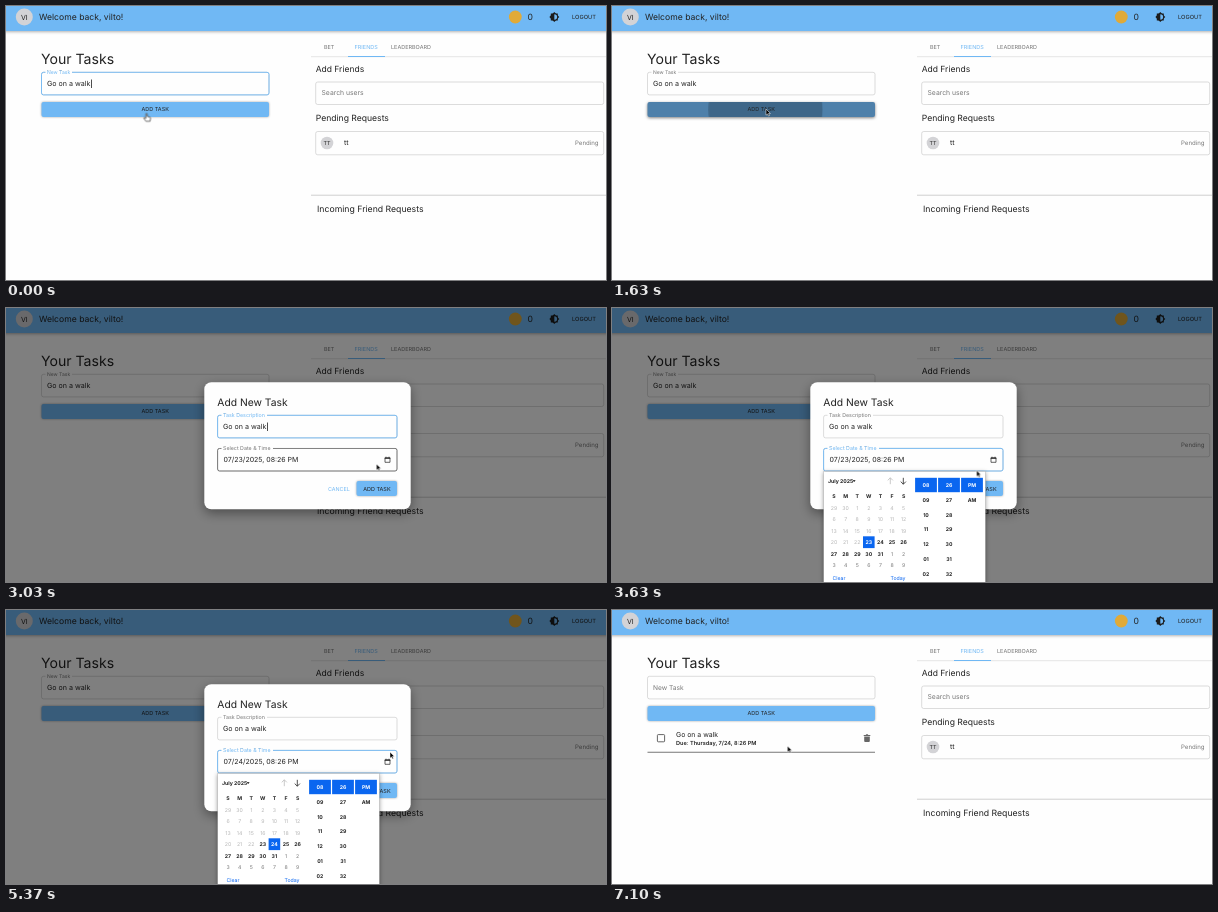
An HTML page that plays this animation: 600x274 px, repeating every 7140 ms.

```html
<!DOCTYPE html>
<html lang="en">
<head>
<meta charset="utf-8">
<title>Task planner</title>
<style>
  html, body { margin: 0; width: 100%; height: 100%; overflow: hidden; background: #fefefe; }
  svg { display: block; width: 100vw; height: 100vh; --blue: #70b8f4; --dark: #4e80aa; }
  text { font-family: Inter, "Open Sans", sans-serif; fill: #222; text-rendering: geometricPrecision; white-space: pre; }
  .mid { text-anchor: middle; }
  .bold { font-weight: 700; }
  .blue { fill: var(--blue); }
  .gray { fill: #777; }
  .white { fill: #fff; }
  .bg { fill: #fefefe; }
  .box { fill: none; stroke: #c4c4c4; stroke-width: .6; }
  .on { fill: none; stroke: var(--blue); stroke-width: .9; }
  .btn { fill: var(--blue); filter: drop-shadow(0 .8px .8px rgba(0,0,0,.35)); }
  .bar { fill: var(--blue); filter: drop-shadow(0 1px 1.5px rgba(0,0,0,.3)); }
  .avatar { fill: #d3d3d6; }
  .paper { fill: #fefefe; filter: drop-shadow(0 4px 6px rgba(0,0,0,.4)); }
  .popup { fill: #fff; stroke: #aaa; stroke-width: .4; filter: drop-shadow(0 1px 2px rgba(0,0,0,.4)); }
  .pick { fill: #0a66f0; }

  /* hard switches */
  .pageFocus, .filled, .done, .caret, .taskFocus, .dateFocus, .dateHover,
  .calendar, .before, .after, .cellHover, .hand, .arrow {
    animation: 7140ms step-end infinite;
  }
  .pageFocus { animation-name: pageFocus; }
  .filled { animation-name: filled; }
  .done { animation-name: done; }
  .caret { animation-name: caret; }
  .taskFocus { animation-name: taskFocus; }
  .dateFocus { animation-name: dateFocus; }
  .dateHover { animation-name: dateHover; }
  .calendar { animation-name: calendar; }
  .before { animation-name: before; }
  .after { animation-name: after; }
  .cellHover { animation-name: cellHover; }
  .hand { animation-name: hand; }
  .arrow { animation-name: arrow; }
  @keyframes pageFocus { 0% { opacity: 1 } 20.22%, 100% { opacity: 0 } }
  @keyframes filled { 0% { opacity: 1 } 88.66%, 100% { opacity: 0 } }
  @keyframes done { 0% { opacity: 0 } 88.66%, 100% { opacity: 1 } }
  @keyframes caret {
    0%, 9.8%, 23.8%, 37.8% { opacity: 1 }
    2.8%, 16.8%, 30.8%, 44.8%, 100% { opacity: 0 }
  }
  @keyframes taskFocus { 0% { opacity: 1 } 46.9%, 100% { opacity: 0 } }
  @keyframes dateFocus { 0%, 85.15%, 100% { opacity: 0 } 46.9% { opacity: 1 } }
  @keyframes dateHover { 0%, 46.9%, 100% { opacity: 0 } 39% { opacity: 1 } }
  @keyframes calendar { 0%, 77%, 100% { opacity: 0 } 47.6% { opacity: 1 } }
  @keyframes before { 0% { opacity: 1 } 63%, 100% { opacity: 0 } }
  @keyframes after { 0% { opacity: 0 } 63%, 100% { opacity: 1 } }
  @keyframes cellHover { 0%, 63%, 100% { opacity: 0 } 59.5% { opacity: 1 } }
  @keyframes hand { 0%, 17.5%, 81.5% { opacity: 1 } 5.5%, 20.22%, 91.5%, 100% { opacity: 0 } }
  @keyframes arrow { 0%, 17.5%, 81.5% { opacity: 0 } 5.5%, 20.22%, 91.5%, 100% { opacity: 1 } }

  /* smooth changes */
  .dialog { animation: dialog 7140ms ease-in-out infinite; }
  @keyframes dialog {
    0%, 22.97% { opacity: 0 }
    26.12%, 88.66% { opacity: 1 }
    91.46%, 100% { opacity: 0 }
  }
  .pageBtn { animation: pageBtn 7140ms ease-in-out infinite; }
  @keyframes pageBtn {
    0%, 16.8%, 26.5%, 100% { fill: var(--blue); filter: drop-shadow(0 .8px .8px rgba(0,0,0,.35)) }
    20.2%, 23% { fill: var(--dark); filter: drop-shadow(0 1.6px 1.8px rgba(0,0,0,.5)) }
  }
  .sendBtn { animation: sendBtn 7140ms ease-in-out infinite; }
  @keyframes sendBtn {
    0%, 81.5% { fill: var(--blue); filter: drop-shadow(0 .8px .8px rgba(0,0,0,.35)) }
    85%, 100% { fill: var(--dark); filter: drop-shadow(0 1.6px 1.8px rgba(0,0,0,.5)) }
  }
  .ripple { fill: #000; transform-box: fill-box; transform-origin: center; }
  .pageRipple { animation: pageRipple 7140ms cubic-bezier(.4,0,.2,1) infinite; }
  @keyframes pageRipple {
    0%, 20.22% { transform: scale(0); opacity: .2 }
    27.93% { transform: scale(1); opacity: .2 }
    32%, 100% { transform: scale(1); opacity: 0 }
  }
  .sendRipple { animation: sendRipple 7140ms cubic-bezier(.4,0,.2,1) infinite; }
  @keyframes sendRipple {
    0%, 85.15% { transform: scale(0); opacity: .2 }
    92.86%, 100% { transform: scale(1); opacity: .2 }
  }
  .cursor { animation: cursor 7140ms ease-in-out infinite; }
  @keyframes cursor {
    0% { transform: translate(140.5px, 107.5px) }
    8.4%, 14.7% { transform: translate(147px, 95.5px) }
    18.9%, 26.6% { transform: translate(154px, 103px) }
    40.6%, 42.5% { transform: translate(370.5px, 156px) }
    45.5%, 47.6% { transform: translate(380.5px, 151.5px) }
    60.2%, 65.1% { transform: translate(265.5px, 230.5px) }
    74.9%, 77.3% { transform: translate(384px, 142px) }
    82.6%, 92.9% { transform: translate(382.5px, 178.5px) }
    99.1%, 100% { transform: translate(175.5px, 136px) }
  }
</style>
</head>
<body>
<svg viewBox="0 0 600 274" preserveAspectRatio="none">
  <defs>
    <clipPath id="pageClip"><rect x="35.5" y="96" width="227.5" height="15" rx="2"/></clipPath>
    <clipPath id="sendClip"><rect x="350.5" y="173" width="40.5" height="15" rx="2"/></clipPath>
  </defs>
  <rect class="bg" width="600" height="274"/>

  <!-- header -->
  <rect class="bar" x="-5" y="-5" width="610" height="30"/>
  <circle class="avatar" cx="18.3" cy="11" r="8.5"/>
  <text class="mid" x="18.3" y="13.5" font-size="7">VI</text>
  <text x="33" y="14.2" font-size="8.6">Welcome back, vilto!</text>
  <circle cx="509.3" cy="11" r="6.4" fill="#e0aa38"/>
  <text x="521.5" y="14.1" font-size="8.6">0</text>
  <g transform="translate(548.3 11)" fill="#1c1c1c">
    <rect x="-3.5" y="-3.5" width="7" height="7"/>
    <rect x="-3.5" y="-3.5" width="7" height="7" transform="rotate(45)"/>
    <path class="blue" d="M0-2.8a2.8 2.8 0 0 1 0 5.6z"/>
  </g>
  <text x="566" y="13" font-size="5.7">LOGOUT</text>

  <!-- tasks -->
  <text x="35" y="57.5" font-size="14.1">Your Tasks</text>
  <rect class="box" x="35.5" y="66.3" width="227.5" height="22.6" rx="2"/>
  <g class="filled">
    <rect class="bg" x="39.5" y="65" width="26.5" height="3"/>
    <text class="gray" x="41" y="68.2" font-size="5">New Task</text>
    <text x="41" y="80" font-size="7.1">Go on a walk</text>
  </g>
  <g class="pageFocus">
    <rect class="on" x="35.5" y="66.3" width="227.5" height="22.6" rx="2"/>
    <rect class="bg" x="39.5" y="65" width="26.5" height="4"/>
    <text class="blue" x="41" y="68.2" font-size="5">New Task</text>
    <rect class="caret" x="85" y="73.5" width=".7" height="8.5"/>
  </g>
  <rect class="btn pageBtn" x="35.5" y="96" width="227.5" height="15" rx="2"/>
  <g clip-path="url(#pageClip)"><circle class="ripple pageRipple" cx="153.5" cy="103.5" r="120"/></g>
  <text class="mid" x="149.2" y="105.4" font-size="5.5">ADD TASK</text>
  <g class="done">
    <text class="gray" x="41" y="80" font-size="6.6">New Task</text>
    <rect x="45.4" y="124.6" width="7.2" height="7.2" rx=".8" fill="none" stroke="#555" stroke-width=".9"/>
    <text x="64" y="126.5" font-size="6.9">Go on a walk</text>
    <text x="64" y="135" font-size="5.6" font-weight="600">Due: Thursday, 7/24, 8:26 PM</text>
    <path fill="#666" d="M251.7 124.9h2l.5-.7h1.6l.5.7h2v1h-6.6zM252.2 126.4h5.6v4.7q0 .9-.9.9h-3.8q-.9 0-.9-.9z"/>
    <rect x="35.5" y="141.8" width="227.5" height=".8" fill="#555"/>
  </g>

  <!-- friends -->
  <g font-size="5.5">
    <text class="mid gray" x="323.2" y="43">BET</text>
    <text class="mid blue" x="360.2" y="43">FRIENDS</text>
    <text class="gray" x="385" y="43">LEADERBOARD</text>
  </g>
  <rect x="305" y="50.6" width="295" height=".5" fill="#ccc"/>
  <rect class="blue" x="342" y="50" width="37" height="1"/>
  <text x="309.7" y="65.5" font-size="8.5">Add Friends</text>
  <rect class="box" x="309.7" y="76" width="288" height="22.5" rx="2"/>
  <text class="gray" x="315.5" y="89.4" font-size="6.8">Search users</text>
  <text x="309.7" y="115" font-size="8.6">Pending Requests</text>
  <rect class="box" x="309.7" y="125.5" width="288" height="23.3" rx="2"/>
  <circle class="avatar" cx="321" cy="137" r="6.3"/>
  <text class="mid" x="321" y="139" font-size="5.4">TT</text>
  <text x="338" y="139.4" font-size="7">tt</text>
  <text class="gray" x="569" y="139.2" font-size="6.1">Pending</text>
  <rect x="305" y="188.8" width="295" height=".7" fill="#bbb"/>
  <text x="311" y="205.7" font-size="8.7">Incoming Friend Requests</text>

  <!-- dialog -->
  <g class="dialog">
    <rect width="600" height="274" opacity=".5"/>
    <rect class="paper" x="198.3" y="74.3" width="206.4" height="127" rx="7"/>
    <text x="211.3" y="97.6" font-size="10.3">Add New Task</text>

    <rect class="box" x="211.6" y="107.3" width="179.4" height="22.6" rx="2"/>
    <rect class="bg" x="215.5" y="106" width="45.5" height="3"/>
    <text class="gray" x="217" y="109.2" font-size="5.3">Task Description</text>
    <g class="taskFocus">
      <rect class="on" x="211.6" y="107.3" width="179.4" height="22.6" rx="2"/>
      <rect class="bg" x="215.5" y="105.5" width="45.5" height="4.5"/>
      <text class="blue" x="217" y="109.2" font-size="5.3">Task Description</text>
      <rect class="caret" x="261" y="114.5" width=".7" height="8.5"/>
    </g>
    <text x="217" y="121.2" font-size="7.1">Go on a walk</text>

    <rect class="box" x="211.6" y="140.4" width="179.4" height="22.6" rx="2"/>
    <rect class="dateHover" x="211.6" y="140.4" width="179.4" height="22.6" rx="2" fill="none" stroke="#333" stroke-width=".6"/>
    <rect class="bg" x="215.5" y="139" width="51.5" height="3"/>
    <text class="gray" x="217" y="142.3" font-size="5.3">Select Date &amp; Time</text>
    <g class="dateFocus">
      <rect class="on" x="211.6" y="140.4" width="179.4" height="22.6" rx="2"/>
      <rect class="bg" x="215.5" y="138.5" width="51.5" height="4.5"/>
      <text class="blue" x="217" y="142.3" font-size="5.3">Select Date &amp; Time</text>
    </g>
    <text class="before" x="217.5" y="154.3" font-size="7">07/23/2025, 08:26 PM</text>
    <text class="after" x="217.5" y="154.3" font-size="7">07/24/2025, 08:26 PM</text>
    <path d="M379 150h5v4.3h-5zM380 148.7v1M383 148.7v1" fill="none" stroke="#222" stroke-width=".7"/>
    <path d="M378.7 149.5h5.6v1.2h-5.6z" fill="#222"/>

    <text class="blue" x="322" y="182.7" font-size="5.4">CANCEL</text>
    <rect class="btn sendBtn" x="350.5" y="173" width="40.5" height="15" rx="2"/>
    <g clip-path="url(#sendClip)"><circle class="ripple sendRipple" cx="382" cy="181" r="40"/></g>
    <text class="mid" x="370.9" y="182.7" font-size="5.5">ADD TASK</text>
  </g>

  <!-- date picker -->
  <g class="calendar" id="calendar" font-size="5.2">
    <rect class="popup" x="211.8" y="163.5" width="161.5" height="116"/>
    <text class="bold" x="216" y="174.8">July 2025</text>
    <path d="M240.6 172.2h3l-1.5 1.9z"/>
    <path d="M278.3 176.2v-6.4m-2.6 2.6l2.6-2.6 2.6 2.6" fill="none" stroke="#bbb" stroke-width=".8"/>
    <path d="M291.3 169.8v6.4m-2.6-2.6l2.6 2.6 2.6-2.6" fill="none" stroke="#222" stroke-width=".8"/>
    <text class="mid pick" x="227" y="272">Clear</text>
    <text class="mid pick" x="286" y="272">Today</text>
  </g>

  <g class="cursor">
    <path class="arrow" d="M0 0V6.2L1.5 4.9 2.5 7 3.5 6.6 2.5 4.5H4.4Z" stroke="#fff" stroke-width=".5"/>
    <path class="hand" d="M-.7.6a.7.7 0 0 1 1.4 0V3l2.6.6q.9.3.7 1.4l-.5 2.8H-.6L-2.7 5q-.3-.8.5-.9l1.5.8Z" fill="#fff" stroke="#111" stroke-width=".6"/>
  </g>
</svg>
<script>
  const calendar = document.getElementById('calendar');

  function add(tag, attrs, content = '') {
    const node = document.createElementNS('http://www.w3.org/2000/svg', tag);
    for (const key in attrs) node.setAttribute(key, attrs[key]);
    node.textContent = content;
    calendar.append(node);
    return node;
  }
  const label = (x, y, content, cls = '', fill = '#222') =>
    add('text', { x, y: y + 1.9, class: 'mid ' + cls }, content).style.fill = fill;
  const block = (x, y, w, h, cls) =>
    add('rect', { x: x - w / 2, y: y - h / 2, width: w, height: h, class: cls });

  const colX = c => 222 + c * 11.6;
  const rowY = r => 200 + r * 11.4;

  [...'SMTWTFS'].forEach((day, c) => label(colX(c), 188, day, 'bold'));

  // Six weeks, starting on June 29
  for (let i = 0; i < 42; i++) {
    const day = i - 1;
    const x = colX(i % 7), y = rowY(Math.floor(i / 7));
    const shown = day < 1 ? day + 30 : day > 31 ? day - 31 : day;
    const fill = day < 23 ? '#b5b5b5' : day > 31 ? '#777' : '#222';
    label(x, y, shown, day > 22 && day < 32 ? 'bold' : '', fill);
    if (day === 24) block(x, y, 11.2, 11.4, 'cellHover').style.cssText = 'fill:#a9cbee;stroke:#4a78b0;stroke-width:.6';
    if (day === 24) label(x, y, day, 'bold cellHover');
    if (day === 23 || day === 24) {
      const state = day === 23 ? 'before' : 'after';
      block(x, y, 11.6, 11.8, 'pick ' + state);
      label(x, y, day, 'bold ' + state, '#fff');
    }
  }

  const pad = n => String(n).padStart(2, '0');
  const rows = [0, 1, 2, 3, 4, 5, 6];
  const times = [
    rows.map(i => pad((i + 7) % 12 + 1)),
    rows.map(i => pad(26 + i)),
    ['PM', 'AM']
  ];
  times.forEach((list, c) => {
    const x = 314 + c * 23;
    block(x, 177, 21.8, 14.4, 'pick');
    list.forEach((value, r) => label(x, 177 + r * 14.8, value, 'bold', r ? '#222' : '#fff'));
  });
</script>
</body>
</html>
```
